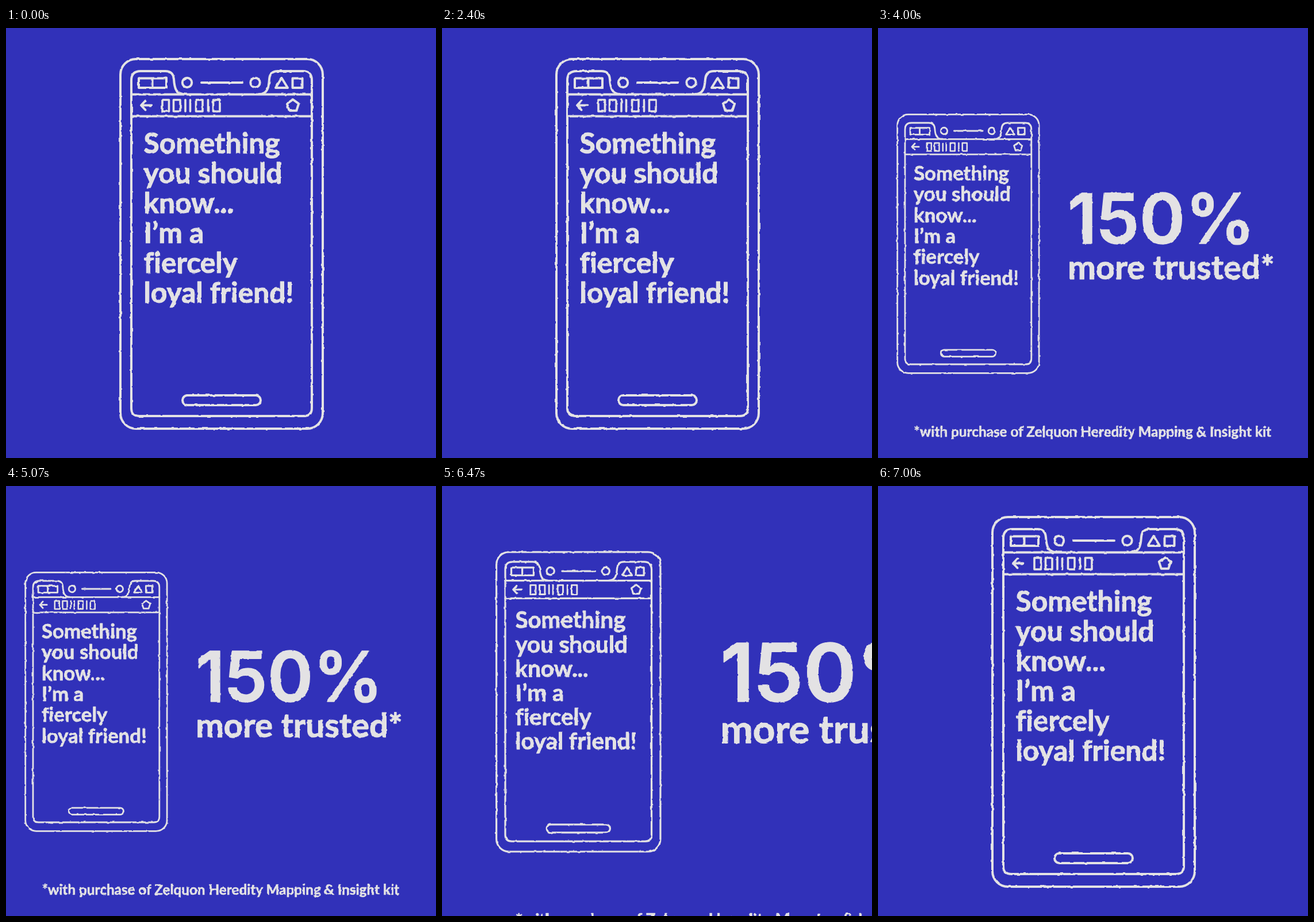
Animation, 748 px wide and 748 px high, one loop 7070 ms. Source, as an HTML page:

```html
<!DOCTYPE html>
<html lang="en">
<head>
<meta charset="utf-8">
<title>Loyal friend</title>
<style>
  html, body { margin: 0; width: 100%; height: 100%; overflow: hidden; background: #3131b9; }
  svg { display: block; width: 100%; height: 100%; }
  text {
    font-family: Lato, "Open Sans", sans-serif;
    font-weight: 700;
    font-variant-ligatures: none;
    fill: #e3e2e4;
    stroke: #e3e2e4;
    stroke-width: 1.1;
    stroke-linejoin: round;
    white-space: pre;
  }
  .line { fill: none; stroke: #e3e2e4; stroke-width: 4; stroke-linecap: round; stroke-linejoin: round; }
  .message { font-size: 49.7px; }
  .number { font-family: Inter, "Open Sans", sans-serif; font-weight: 600; font-size: 172.5px; stroke-width: 2; }
  .claim { font-size: 83px; stroke-width: 1.6; }
  .note { font-size: 34.7px; stroke-width: .8; }
</style>
</head>
<body>
<svg viewBox="0 0 748 748">
  <defs>
    <filter id="rough" filterUnits="userSpaceOnUse" x="0" y="0" width="748" height="748"
            color-interpolation-filters="sRGB">
      <feTurbulence id="noise" type="fractalNoise" baseFrequency=".12" numOctaves="1" seed="1" result="n"/>
      <feDisplacementMap in="SourceGraphic" in2="n" scale="3" xChannelSelector="R" yChannelSelector="G"/>
      <feGaussianBlur stdDeviation=".4"/>
    </filter>
  </defs>
  <rect width="748" height="748" fill="#3131b9"/>
  <g filter="url(#rough)">
    <g id="camera">
      <g class="line">
        <!-- body and screen -->
        <rect x="199" y="54" width="352" height="643" rx="27"/>
        <path d="M218 115V91Q218 75 234 75H277Q291 75 292 89C293 105 296 115 310 115"/>
        <path d="M532 115V91Q532 75 516 75H473Q459 75 458 89C457 105 454 115 440 115"/>
        <path d="M218 115V661Q218 675 232 675H518Q532 675 532 661V115"/>
        <path d="M218 115.5H532M218 153.5H532"/>
        <rect x="307" y="639" width="136" height="17" rx="8.5"/>
        <!-- status bar -->
        <path d="M231 87.500H279V104H231ZM254.500 87.500V104"/>
        <circle cx="315" cy="95" r="8.200"/>
        <path d="M340 95H411"/>
        <circle cx="433.500" cy="95" r="8.200"/>
        <path d="M479.500 87L490 104H469ZM498.500 87.500H515.500V104H498.500Z"/>
        <!-- address bar -->
        <path d="M252.500 134.500H235.500M242.500 126.500L235 134.500L242.500 142.500"/>
        <path id="digits" stroke-width="3.600"/>
        <path id="pentagon"/>
      </g>
      <g id="message" class="message"></g>
      <g id="stat">
        <text class="number" x="622" y="375">150%</text>
        <text class="claim" x="622.500" y="463.500">more trusted*</text>
      </g>
      <text class="note" x="240" y="855">*with purchase of Zelquon Heredity Mapping &amp; Insight kit</text>
    </g>
  </g>
</svg>
<script>
  const LOOP = 7070, STEP = 1000 / 15, LAST = 105;
  const FAR = 0.7;                    // scale of the zoomed-out view
  const PIVOT = { x: -352, y: 375 };  // fixed point of the zoom
  const DRIFT = 520;                  // extra sideways travel of the big number
  const $ = id => document.getElementById(id);

  function buildPhone() {
    const box = x => `M${x} 125h11.500v20h-11.500z`;
    const bar = x => `M${x} 125v20`;
    $('digits').setAttribute('d',
      [272, 291.5, 330.5, 360.5].map(box).join('') + [312, 320.5, 351.5].map(bar).join(''));

    const corners = Array.from({ length: 5 }, (_, i) => {
      const a = (i * 0.4 - 0.5) * Math.PI;
      return `${499 + 10.7 * Math.cos(a)} ${135 + 10.7 * Math.sin(a)}`;
    });
    $('pentagon').setAttribute('d', `M${corners.join('L')}Z`);

    const lines = ['Something', 'you should', 'know...', 'I’m a', 'fiercely', 'loyal friend!'];
    $('message').innerHTML = lines
      .map((s, i) => `<text x="239.500" y="${217.6 + 52 * i}">${s}</text>`).join('');
  }

  const clamp = v => Math.min(1, Math.max(0, v));
  const easeOut = p => 1 - Math.pow(1 - p, 2.9);

  // cubic-bezier(x1, 0, x2, 1), solved by bisection
  function easeInOut(p, x1 = 0.73, x2 = 0.284) {
    let lo = 0, hi = 1;
    for (let i = 0; i < 24; i++) {
      const u = (lo + hi) / 2, v = 1 - u;
      const x = 3 * v * v * u * x1 + 3 * v * u * u * x2 + u * u * u;
      if (x < p) lo = u; else hi = u;
    }
    return lo * lo * (3 - 2 * lo);
  }

  function zoomAt(frame) {
    const out = easeOut(clamp((frame - 43) / 10));
    const back = easeInOut(clamp((frame - 90) / 15));
    return 1 - (1 - FAR) * (out - back);
  }

  function draw(frame) {
    const s = zoomAt(frame);
    $('camera').setAttribute('transform',
      `translate(${PIVOT.x * (1 - s)} ${PIVOT.y * (1 - s)}) scale(${s})`);
    $('stat').setAttribute('transform', `translate(${DRIFT * (s - FAR)} 0)`);
    $('noise').setAttribute('seed', 1 + Math.floor(frame / 4));
  }

  let shown = -1;
  const start = performance.now();

  function tick() {
    const t = (performance.now() - start) % LOOP;
    const frame = Math.min(LAST, Math.floor((t + 7) / STEP));
    if (frame !== shown) draw(shown = frame);
    requestAnimationFrame(tick);
  }

  buildPhone();
  tick();
</script>
</body>
</html>
```
